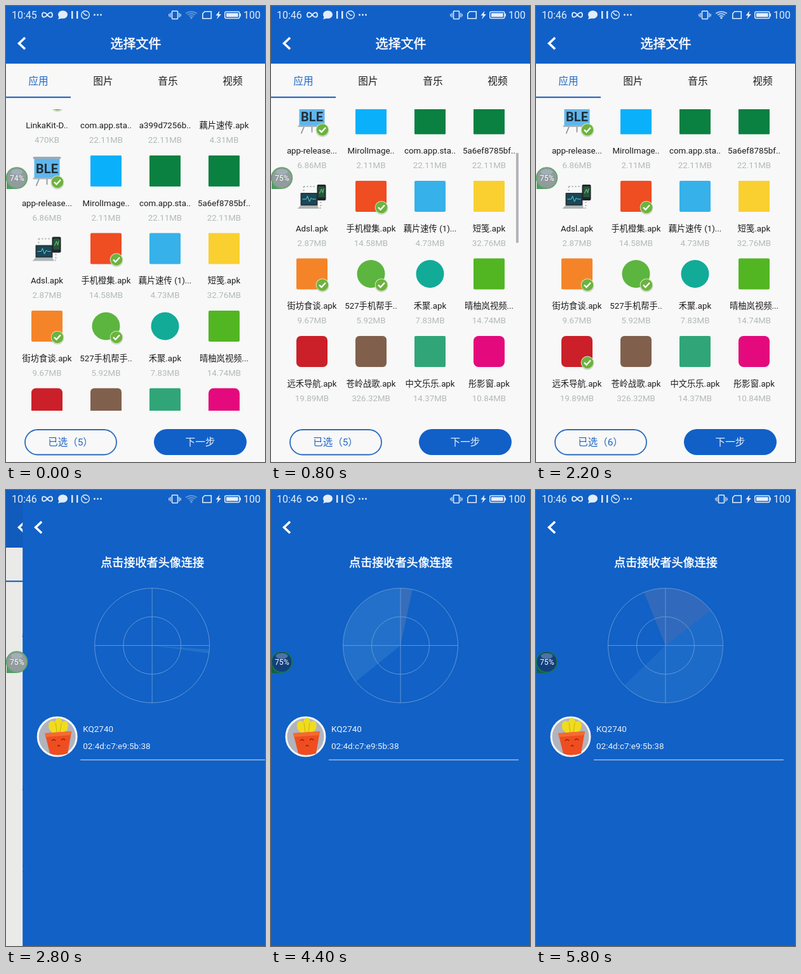
An HTML page for the animation above (6 s loop, 408 by 720 pixels).

```html
<!DOCTYPE html>
<html lang="zh-CN">
<head>
<meta charset="utf-8">
<style>
html, body { margin: 0; width: 100%; height: 100%; overflow: hidden; background: #1161c6; }
svg { display: block; width: 408px; height: 720px; font-family: Roboto, "Noto Sans CJK SC", "Noto Sans CJK", "Noto Sans", sans-serif; }
.mid { text-anchor: middle; }
.line { fill: none; stroke-linecap: butt; stroke-linejoin: miter; }
</style>
</head>
<body>
<svg id="stage" viewBox="0 0 408 720"></svg>
<script>
const LOOP = 6000, TICK = 200, PITCH = 122.5;
const BLUE = '#1160c8', PAPER = '#f8f8f8';
const stage = document.getElementById('stage');

const rect = (x, y, w, h, fill, r = 0, more = '') =>
  `<rect x="${x}" y="${y}" width="${w}" height="${h}" rx="${r}" fill="${fill}" ${more}/>`;
const disc = (x, y, r, fill, more = '') =>
  `<circle cx="${x}" cy="${y}" r="${r}" fill="${fill}" ${more}/>`;
const line = (d, color, w, more = '') =>
  `<path class="line" d="${d}" stroke="${color}" stroke-width="${w}" ${more}/>`;
const shape = (d, fill, more = '') => `<path d="${d}" fill="${fill}" ${more}/>`;
const text = (s, x, y, size, fill, more = '') =>
  `<text x="${x}" y="${y}" font-size="${size}" fill="${fill}" ${more}>${s}</text>`;
const label = (s, x, y, size, fill, more = '') => text(s, x, y, size, fill, 'class="mid" ' + more);
const title = (s, y, size) => label(s, 204.5, y, size, '#fff', 'stroke="#fff" stroke-width=".5"');

const tile = (color, r = 1) => rect(-24.5, 0, 49, 49, color, r);
const round = color => disc(0, 24.5, 22, color);

const board = () =>
  line('M-12 36L-17 48M12 36L17 48M0 36V46', '#8d979d', 1.8) +
  rect(-20, 5, 40, 31, '#5fb6ec') +
  rect(-22, 2, 44, 3.5, '#9aabb6', 1.5) +
  rect(-22, 35, 44, 2.5, '#a5b4bd', 1) +
  label('BLE', 0, 28, 20, '#22303c', 'font-weight="700"');

const computers = () =>
  line('M-13 9H6M-13 9V18M14 33V43H4', '#a9b0b0', 2, 'stroke-dasharray="2 3"') +
  rect(-18, 19, 27, 20, '#2c3538', 1) + rect(-16, 21, 23, 16, '#17485c') +
  line('M-15 29H-9L-7 24L-4 33L-1 27L1 29H6', '#6fd0c0', 1) +
  shape('M-18 39H9L11 44H-23Z', '#aeb6b6') +
  rect(8, 6, 14, 25, '#20262a', 2) + rect(10, 9, 10, 17, '#24563a') +
  line('M12 20L15 13L17 19L19 12', '#73cf80', 1);

const tick = () =>
  disc(16.5, 43, 10.5, '#8b958a', 'opacity=".4"') +
  disc(16.5, 42, 10.3, '#d4e6c4') + disc(16.5, 42, 9.3, '#6db33f') +
  line('M11.5 42L15 45.5L21.5 38.5', '#fff', 2.4);

// name, size, icon, picked
const files = [
  ['LinkaKit-D..', '470KB', '', 1],
  ['com.app.sta..', '22.11MB', ''],
  ['a399d7256b..', '22.11MB', ''],
  ['藕片速传.apk', '4.31MB', ''],
  ['app-release...', '6.86MB', board(), 1],
  ['MirolImage..', '2.11MB', tile('#0bb0fb')],
  ['com.app.sta..', '22.11MB', tile('#0a8041')],
  ['5a6ef8785bf..', '22.11MB', tile('#0a8041')],
  ['Adsl.apk', '2.87MB', computers()],
  ['手机橙集.apk', '14.58MB', tile('#ef4d22', 2), 1],
  ['藕片速传 (1)...', '4.73MB', tile('#36b1e9', 2)],
  ['短笺.apk', '32.76MB', tile('#f9d030')],
  ['街坊食谈.apk', '9.67MB', tile('#f58428', 2), 1],
  ['527手机帮手..', '5.92MB', round('#5cb53f'), 1],
  ['禾聚.apk', '7.83MB', round('#12ab98')],
  ['晴柚岚视频...', '14.74MB', tile('#52b623', 2)],
  ['远禾导航.apk', '19.89MB', tile('#cb2029', 7), 2],
  ['苍岭战歌.apk', '326.32MB', tile('#80604d', 6)],
  ['中文乐乐.apk', '14.37MB', tile('#30a678', 2)],
  ['彤影窗.apk', '10.84MB', tile('#e4097c', 8)]
];

const cell = ([name, size, icon, picked], i) => {
  const x = 64.5 + 93 * (i % 4), y = 113.5 + PITCH * Math.floor(i / 4);
  return `<g transform="translate(${x} ${y})">${icon}` +
    (picked ? `<g ${picked > 1 ? 'id="pick"' : ''}>${tick()}</g>` : '') +
    label(name, 0, 79.5, 13.3, '#1c1c1c') +
    label(size, 0, 102.5, 13.3, '#b0bab5') + '</g>';
};

const chevron = line('M30 50L20.5 59L30 68', '#fff', 3.6);

const listPage = () =>
  rect(0, 0, 408, 720, PAPER) + rect(0, 0, 408, 91, BLUE) + chevron +
  title('选择文件', 67, 20) +
  ['应用', '图片', '音乐', '视频'].map((s, i) =>
    label(s, 51 + 102 * i, 124, 15.7, i ? '#1c1c1c' : '#2067c4')).join('') +
  rect(0, 143, 102, 2.2, '#2667bd') +
  `<g clip-path="url(#view)"><g id="grid">${files.map(cell).join('')}</g></g>` +
  rect(386, 0, 4, 142, '#b3b4ba', 1, 'id="bar"') +
  rect(30, 669, 144, 39.5, PAPER, 19.7, 'stroke="#2c6bbf" stroke-width="1.8"') +
  label('', 101.5, 694, 15.5, '#2065c4', 'id="count"') +
  rect(233, 668, 146, 41, BLUE, 20.5) +
  label('下一步', 306, 694, 15.7, '#e6effa') +
  rect(0, 0, 408, 720, '#101800', 0, 'id="dim"');

const avatar = () =>
  disc(54.5, 389.5, 30.5, '#b0b4be', 'stroke="#f4f6f8" stroke-width="3"') +
  shape('M42 378C38 366 46 361 51 367C53 357 61 357 62 367C68 361 75 367 70 379L64 384H48Z', '#f0dc1c') +
  line('M52 368L54 382M61 368L59 382', '#c9b20c', 1) +
  shape('M35 384L77 381L71 416Q54 421 43 416Z', '#ef4d20') +
  shape('M35 384L77 381L76 387L36 390Z', '#f46b32') +
  line('M46 396Q49 392 52 396M61 395Q64 391 67 395M55 405Q57 401 59 405', '#8a2412', 1.3);

const radarPage = () =>
  rect(0, 0, 408, 720, '#1161c6') + chevron +
  title('点击接收者头像连接', 121, 18.1) +
  shape('', '#3a86cc', 'id="sweep"') +
  shape('', '#6a6a9c', 'id="glow" opacity=".28"') +
  [90.5, 45.5].map(r => disc(204, 245.5, r, 'none', 'stroke="#6b9bd9" stroke-width=".9"')).join('') +
  line('M113.5 245.5H294.5M204 155V336', '#6b9bd9', .9) +
  avatar() +
  text('KQ2740', 95, 382, 13.5, '#eaf1fa') +
  text('02:4d:c7:e9:5b:38', 95, 409, 13.5, '#eaf1fa') +
  rect(91, 425.5, 299, 1.2, '#c2d0e2') + rect(390, 425.5, 18, 1.2, '#c2d0e2', 0, 'id="tail"');

const ink = '#e3edf8';
const arc = r => `M${292 - r * .8} ${19 - r * .65}Q292 ${19 - r * 1.2} ${292 + r * .8} ${19 - r * .65}`;
const statusBar = () =>
  text('', 9, 19.8, 16, ink, 'id="clock"') +
  line('M65 14C61 9 57 9.5 57 14S61 19 65 14S73 9.5 73 14S69 19 65 14Z', ink, 1.8) +
  `<ellipse cx="89.5" cy="13.5" rx="7.5" ry="6.3" fill="${ink}"/>` + shape('M84 16L82 21L89 19Z', ink) +
  rect(103, 8, 2.4, 12, ink) + rect(111, 8, 2.4, 12, ink) +
  disc(125, 14, 6.3, 'none', `stroke="${ink}" stroke-width="1.4"`) + line('M121.5 10.5L125 14.5H128', ink, 1.4) +
  [139.5, 144.5, 149.5].map(x => disc(x, 14, 1.4, ink)).join('') +
  `<g id="buzz">${rect(287.5, 8, 9, 12.5, 'none', 1, `stroke="${ink}" stroke-width="1.6"`)}` +
  line('M285 11V18M299 11V18M282.8 12.5V16.5M301.2 12.5V16.5', ink, 1.2) + '</g>' +
  `<g id="wifi">${[11, 7.5, 4].map(r => line(arc(r), ink, 1.8)).join('')}${disc(292, 18.8, 1.8, ink)}</g>` +
  line('M313 8.8H323.3V19.8H309.8V12Z', ink, 1.6, 'stroke-linejoin="round"') +
  shape('M336.5 7.5L330.5 15H334L332 21L339 13H335.3Z', ink) +
  rect(344.8, 9, 23, 10.5, 'none', 2, `stroke="${ink}" stroke-width="1.5"`) +
  rect(347, 11.2, 18.6, 6.1, ink) + rect(368.3, 12, 1.7, 4.5, ink) +
  text('100', 374, 19.8, 16, ink);

const bubble = () =>
  shape('M1 289V272H17V289Z', '#4f9b62', 'id="foot"') +
  disc(17, 271.5, 16.3, '#929b9d', 'id="ball" stroke="#62a569" stroke-width="1.8"') +
  `<ellipse cx="17" cy="262" rx="9.5" ry="4.5" fill="#b9d4ec" opacity=".35"/>` +
  label('', 17.3, 276.3, 12.2, '#fff', 'id="load"');

stage.innerHTML =
  '<defs><clipPath id="view"><rect x="0" y="163" width="408" height="476"/></clipPath></defs>' +
  `<g>${listPage()}</g><g id="radar">${radarPage()}</g>${bubble()}${statusBar()}`;

const $ = id => document.getElementById(id);
const set = (id, attrs) => { for (const k in attrs) $(id).setAttribute(k, attrs[k]); };

// Linear interpolation through [time, value] points.
function along(points, t) {
  if (t <= points[0][0]) return points[0][1];
  for (let i = 1; i < points.length; i++) {
    const [t0, a] = points[i - 1], [t1, b] = points[i];
    if (t <= t1) return a + (b - a) * (t - t0) / (t1 - t0);
  }
  return points[points.length - 1][1];
}

function sector(from, to) {
  if (to <= from) return '';
  const at = deg => {
    const a = deg * Math.PI / 180;
    return `${(204 + 90.5 * Math.cos(a)).toFixed(2)} ${(245.5 + 90.5 * Math.sin(a)).toFixed(2)}`;
  };
  return `M204 245.5L${at(from)}A90.5 90.5 0 ${to - from > 180 ? 1 : 0} 1 ${at(to)}Z`;
}

function draw(t) {
  const scroll = along([[0, 0], [200, 22], [400, 62], [600, 82.5]], t);
  set('grid', { transform: `translate(0 ${-scroll})` });
  set('bar', { y: 163 + (148.5 + scroll) * 142 / 476, opacity: along([[0, 0], [200, 1], [1000, 1], [1400, 0]], t) });
  const chosen = t >= 1400;
  set('pick', { visibility: chosen ? 'visible' : 'hidden' });
  $('count').textContent = `已选（${chosen ? 6 : 5}）`;

  const slide = Math.min(1, Math.max(0, (t - 2576) / 300));
  const left = 408 * (1 - slide) ** 2;
  set('radar', { transform: `translate(${left} 0)`, visibility: slide ? 'visible' : 'hidden' });
  set('dim', { opacity: .08 * slide });
  set('tail', { visibility: slide && slide < 1 ? 'visible' : 'hidden' });

  // The arc starts at angle a and spans a more degrees.
  const a = along([[2750, 0], [2800, 4], [3800, 91], [5000, 191], [5800, 248]], t);
  set('sweep', { d: sector(a, 2 * a), opacity: along([[5000, .42], [5800, .26]], t) });
  const end = t <= 5000 ? 2 * a : along([[5000, 382], [5800, 322]], t);
  set('glow', { d: sector(along([[5000, 270], [5800, 248]], t), end) });

  const late = t >= 400;
  $('clock').textContent = late ? '10:46' : '10:45';
  $('load').textContent = late ? '75%' : '74%';
  const dark = t >= 3000;
  set('ball', { fill: dark ? '#123f7c' : '#929b9d', stroke: dark ? '#17764f' : '#62a569' });
  set('foot', { fill: dark ? '#126044' : '#4f9b62' });

  const wifi = t < 400 ? .4 : t < 1400 ? 0 : t < 2600 ? .8 : t < 3200 ? .4 : 0;
  set('wifi', { opacity: wifi });
  set('buzz', { transform: `translate(${wifi ? -26 : 0} 0)` });
}

const start = performance.now();
function frame() {
  const t = (performance.now() - start) % LOOP;
  draw(Math.floor(t / TICK) * TICK);
  requestAnimationFrame(frame);
}
frame();
</script>
</body>
</html>
```
